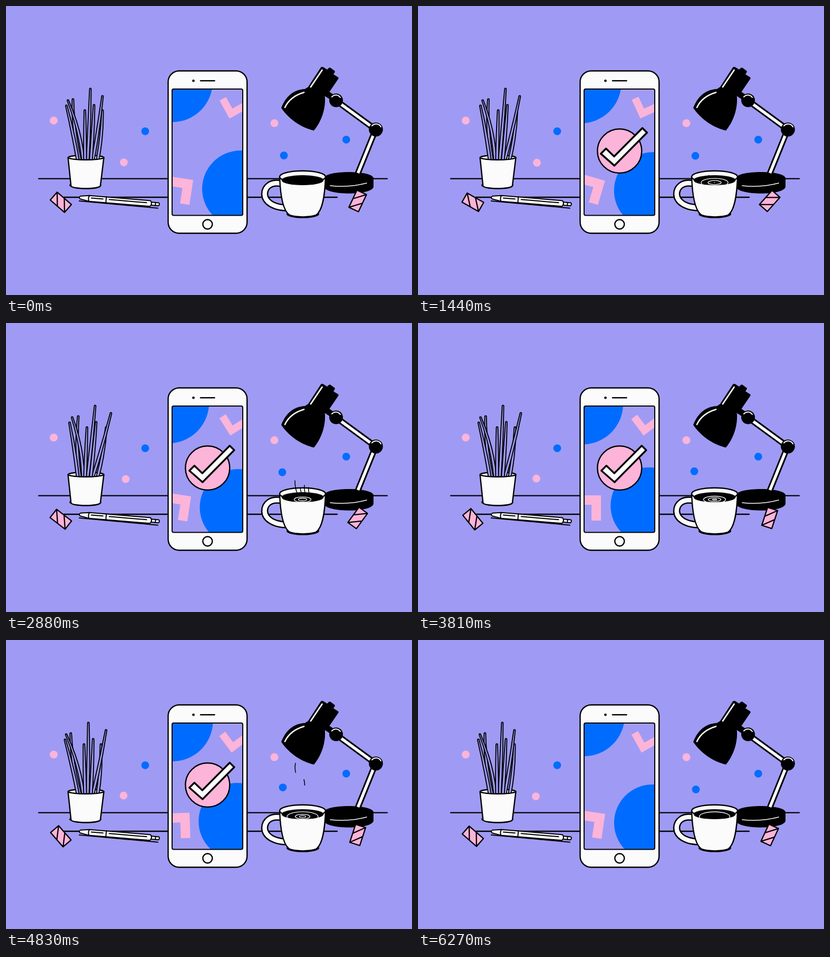
An HTML page that plays this animation: 770 by 550 pixels, repeating every 6.3 s.

```html
<!DOCTYPE html>
<html lang="en">
<head>
<meta charset="utf-8">
<title>Desk with phone</title>
<style>
  html, body { margin: 0; width: 100%; height: 100%; overflow: hidden; background: #9f9bf4; }
  svg { display: block; width: 770px; height: 550px; }
  .line { fill: none; stroke: #000; stroke-width: 2.4; stroke-linecap: round; stroke-linejoin: round; }
  .solid { fill: #fbfbfb; stroke: #000; stroke-width: 2.4; stroke-linejoin: round; }
  .shine { fill: none; stroke: #fbfbfb; stroke-width: 2.8; stroke-linecap: round; }
  .thin { stroke-width: 2; }
  .blue { fill: #006cff; }
  .pink { fill: #fcb4d9; }
  .tape { stroke: #000; stroke-width: 2.3; stroke-linejoin: round; }
  .blade { fill: #9f9bf4; stroke: #000; stroke-width: 1.9; stroke-linejoin: round; }
  .ring { fill: none; stroke: #fbfbfb; stroke-width: 1.3; }
  .steam { fill: none; stroke: #000; stroke-width: 1.5; }
</style>
</head>
<body>
<svg viewBox="0 0 770 550">
  <defs>
    <clipPath id="screen"><rect x="315" y="158" width="134" height="240.5" rx="3"/></clipPath>
    <clipPath id="coffee"><ellipse cx="562.5" cy="331.5" rx="40" ry="9.5"/></clipPath>
    <path id="handle" d="M526 339C502 332 490.5 345 490.5 358C491 373 507 383 531 384"/>
  </defs>

  <path class="line" d="M62 328.6H723M110 364H628"/>

  <!-- floating dots -->
  <circle class="pink" cx="90.5" cy="218" r="7.5"/>
  <circle class="blue" cx="264" cy="238.3" r="7.4"/>
  <circle class="pink" cx="509" cy="223" r="7.5"/>
  <circle class="blue" cx="645.3" cy="254.3" r="7.4"/>
  <circle class="pink" r="7.4" id="pinkDot"/>
  <circle class="blue" r="7.4" id="blueDot"/>

  <!-- plant -->
  <ellipse cx="150.5" cy="341" rx="30.5" ry="7.5"/>
  <ellipse class="solid" cx="151.7" cy="288.5" rx="34" ry="4.6"/>
  <g id="blades"></g>
  <path class="solid" d="M117.7 289C128 294 175 294 185.5 289L179 342C178 349 124 349 123.3 342Z"/>

  <!-- pen -->
  <path class="line thin" d="M139 371L288 384.7"/>
  <g transform="translate(138 364.5) rotate(4.8)">
    <path class="solid thin" d="M138 -2.7H152Q155 0 152 3H138Z"/>
    <path class="solid thin" d="M20 -5.5L3 -3Q-1 0 3 2.5L20 5.5H136Q141 0 136 -5.5Z"/>
    <path class="line thin" d="M20 -5.5Q17 0 20 5.5M52 -5.5V5.5M24 -1H46M58 -1H129M146 -2.7V3"/>
  </g>

  <!-- lamp -->
  <path d="M603 328C603 312 697 312 697 328V344C695 361 606 361 603 344Z"/>
  <path class="shine" style="stroke-width:1.7" d="M615 342Q650 346 684 337"/>
  <path class="line" style="stroke-width:11.5" d="M701 235L668 317M626 180L701 235M607 166L622 176"/>
  <path class="shine" style="stroke-width:5.5;stroke-linecap:butt" d="M696.5 246L667.5 318M630 183L692 228.5"/>
  <circle cx="626" cy="179.5" r="13"/>
  <circle cx="701.5" cy="235" r="13.3"/>
  <path class="shine" style="stroke-width:2" d="M618 173A10 10 0 0 1 634 174M694 228A10.5 10.5 0 0 1 711 230"/>
  <path d="M522 194C531 171 546 159 567 158L573 154L597 117Q599 115 602 116.5L609 121L612 118Q614 116.5 616 118L622 122.5Q625 124 623 127L621 130L629 135Q632 137 630 139L611 167L604 166C608 188 601 217 584 237C561 232 537 216 522 194Z"/>
  <path class="shine" d="M578 154L599.5 122M529 193Q539 172 565 164.5"/>

  <!-- cup -->
  <ellipse cx="563" cy="396" rx="31" ry="7.8"/>
  <g fill="none">
    <use href="#handle" stroke="#000" stroke-width="13.5"/>
    <use href="#handle" stroke="#fbfbfb" stroke-width="8.5"/>
  </g>
  <path class="solid" d="M519 325C520 354 524 389 538 398C551 402.5 575 402.5 588 398C602 388 605 354 606 325Z"/>
  <ellipse class="solid" cx="562.5" cy="325" rx="43.5" ry="11.3"/>
  <ellipse cx="562.5" cy="331.5" rx="40" ry="9.5"/>
  <g id="rings" clip-path="url(#coffee)"></g>
  <g id="steam">
    <path d="M553 325C549 318 548 308 548 300C549 288 556 280 554 268C552 259 546 250 549 234"/>
    <path d="M561 325Q557 318 558 300"/>
    <path d="M568 325Q565 317 566 309C563 300 565 294 565.5 290Q568 278 565 265"/>
    <path d="M575 325Q573 318 574 309Q573 303 575 295"/>
  </g>

  <!-- candies -->
  <g id="leftTape"><path class="pink tape" d="M-18 -10H18V10H-18ZL0 10M0 -10L18 10"/></g>
  <g id="rightTape"><path class="pink tape" d="M-10 -18H10V18H-10ZM10 -18L-10 0M10 0L-10 18"/></g>

  <!-- phone -->
  <rect class="solid" x="307.5" y="123.5" width="149.7" height="309" rx="21"/>
  <circle cx="355.5" cy="142.3" r="2.4"/>
  <path class="line" d="M369 142.3H395.5"/>
  <circle class="solid" cx="382.3" cy="415.5" r="9"/>
  <rect x="315" y="158" width="134" height="240.5" rx="3" fill="#9f9bf4"/>
  <g clip-path="url(#screen)">
    <circle class="blue" r="77" id="topDisc"/>
    <circle class="blue" r="73" id="lowDisc"/>
    <path class="pink" id="topMark" d="M-16 24.5V-14.5H-2V10.5H24V24.5Z"/>
    <path class="pink" id="lowMark" d="M0 0V48H-18V18H-60V0Z"/>
  </g>
  <rect class="line thin" x="315" y="158" width="134" height="240.5" rx="3"/>
  <g id="badge"><circle r="42" class="pink" stroke="#000" stroke-width="2.4"/></g>
  <g id="check"><path class="solid" style="stroke-width:3.4" d="M-34.5 5L-25 -4.5L-10 10L42 -42.5L50.5 -34L-9.5 27Z"/></g>
</svg>

<script>
const LOOP = 6300, STEP = 30, PUFF = 1320;
const KEYS = [0, 780, 2100, 2880, 3810, 4830];
const $ = id => document.getElementById(id);
const clamp = x => Math.min(1, Math.max(0, x));
const span = (t, a, b) => clamp((t - a) / (b - a));

function add(parent, tag, cls) {
  const el = document.createElementNS('http://www.w3.org/2000/svg', tag);
  el.setAttribute('class', cls);
  return parent.appendChild(el);
}

// Smooth periodic curve through one value per key time
function curve(...v) {
  const n = KEYS.length;
  const at = i => v[(i + n) % n];
  const time = i => KEYS[(i + n) % n] + Math.floor(i / n) * LOOP;
  const slope = i => (at(i + 1) - at(i - 1)) / (time(i + 1) - time(i - 1));
  return t => {
    let i = n - 1;
    while (KEYS[i] > t) i--;
    const d = time(i + 1) - time(i), u = (t - time(i)) / d, w = 1 - u;
    return at(i) * (1 + 2 * u) * w * w + slope(i) * d * u * w * w
      + at(i + 1) * u * u * (3 - 2 * u) - slope(i + 1) * d * u * u * w;
  };
}

const still = v => () => v;

// x, y and turn of every drifting part
const movers = [
  ['pinkDot', curve(223.5, 224.5, 226.5, 227, 224.5, 223), curve(297.6, 298.2, 298, 297, 296, 296)],
  ['blueDot', curve(527, 526.6, 525.3, 524, 524, 525), curve(284.5, 285, 285, 284, 282.2, 280.6)],
  ['topDisc', curve(315, 311, 307, 308, 312, 315.5), curve(144, 144.5, 148.5, 152, 154, 154)],
  ['lowDisc', curve(445, 446, 443, 440.5, 438.3, 438.3), curve(348, 350, 352, 351, 347.7, 345)],
  ['topMark', still(426), still(185), curve(-29, -25.5, -25.5, -32, -37, -37)],
  ['lowMark', curve(355, 355, 354, 351, 347, 348), curve(331, 333, 331.5, 330, 328, 328.7), curve(8.5, 12.5, 18, 8.5, 0, -2)],
  ['leftTape', still(104), still(373.5), curve(41, 36, 26, 38, 51, 49)],
  ['rightTape', still(667), still(371), curve(25, 32, 48, 36, 18, 18)]
];

// base x, tip x, tip y, sway, bend
const sway = curve(0, .36, .9, 1, .13, -.42), lateSway = curve(0, .34, .87, 1, .75, .42);
const blades = [
  [174, 183, 199, 7, 4, sway], [165, 183, 172, 16, 2, lateSway],
  [140, 127, 178, 10, -7, sway], [136, 114.5, 190, 6, 2, sway],
  [155, 160, 158, 9, 1, sway], [146, 117.5, 180, 8, 9, sway],
  [161, 167, 189, 4, 1, sway], [150, 149.5, 199, 4, 0, sway]
].map(b => [add($('blades'), 'path', 'blade'), ...b]);

const ringStarts = [60, 420, 940, 1420, 1660, 2240, 2560, 2970, 3330, 3650, 4270, 4590, 5110];
const rings = ringStarts.map(start => {
  const el = add($('rings'), 'ellipse', 'ring');
  el.setAttribute('cx', 562.5);
  el.setAttribute('cy', 336);
  return [el, start];
});

// Each strand: time when fully drawn, time when gone
const puffTimes = [[600, 960], [430, 760], [600, 960], [430, 850]];
const steam = [...$('steam').children].map((el, i) => {
  el.setAttribute('class', 'steam');
  el.setAttribute('pathLength', 1);
  return [el, ...puffTimes[i]];
});

function pop(t, delay) {
  const u = span(t, 1000 + delay, 1400 + delay) - 1;
  const grow = 1 + 2.2 * u * u * u + 1.2 * u * u;
  const leave = span(t, 5550 - delay, 5850 - delay);
  return Math.max(0, grow * (1 - leave * leave));
}

function draw(t) {
  for (const [id, x, y, turn] of movers)
    $(id).setAttribute('transform', `translate(${x(t)} ${y(t)}) rotate(${turn ? turn(t) : 0})`);

  for (const [el, base, tip, y, amount, bend, wave] of blades) {
    const x = tip + amount * wave(t), mx = (base + x) / 2 + bend, my = (y + 292) / 2;
    el.setAttribute('d', `M${base - 2.7} 292Q${mx - 2.9} ${my} ${x - 1.5} ${y}`
      + `A1.5 1.5 0 0 1 ${x + 1.5} ${y}Q${mx + 2.9} ${my} ${base + 2.7} 292`);
  }

  for (const [el, start] of rings) {
    const age = t - start, r = age * .025;
    const live = age > 0 && age < 1200;
    el.setAttribute('rx', live ? r : 0);
    el.setAttribute('ry', live ? r * .31 : 0);
  }

  const puff = t % PUFF;
  for (const [el, full, gone] of steam) {
    const head = span(puff, 100, full), tail = span(puff, 510, gone);
    el.style.visibility = head > tail ? 'visible' : 'hidden';
    el.setAttribute('stroke-dasharray', `${Math.max(0, head - tail)} 3`);
    el.setAttribute('stroke-dashoffset', -tail);
  }

  for (const [id, delay] of [['badge', 0], ['check', 120]]) {
    const s = pop(t, delay);
    $(id).setAttribute('transform', `translate(382.3 276) scale(${s})`);
    $(id).style.visibility = s > .001 ? 'visible' : 'hidden';
  }
}

const begin = performance.now();
function tick() {
  const t = (performance.now() - begin) % LOOP;
  draw(Math.floor(t / STEP) * STEP);
  requestAnimationFrame(tick);
}
draw(0);
tick();
</script>
</body>
</html>
```
